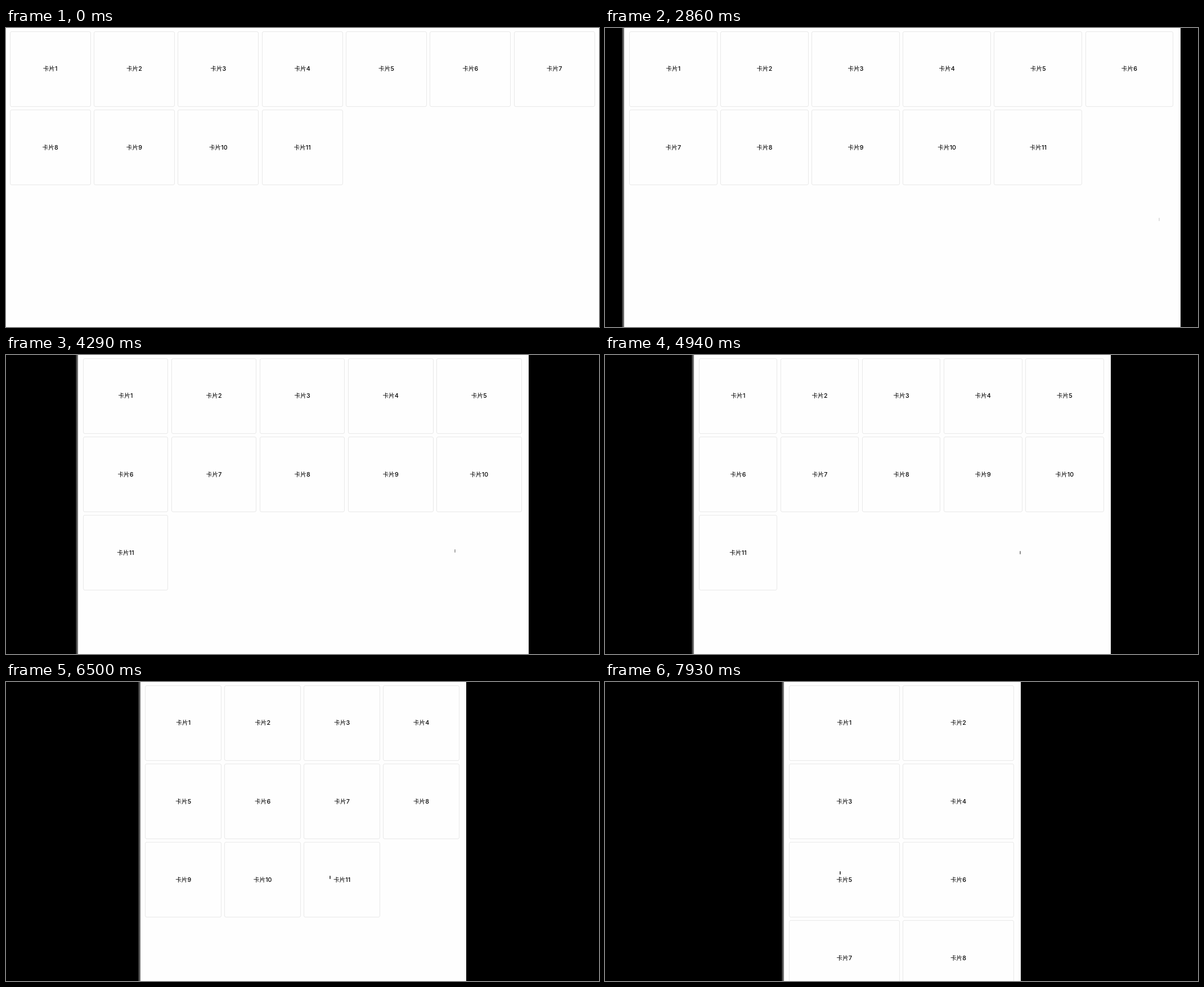
Recreate the animation shown at these times as an HTML page. Size 1054 px wide and 531 px high, loop 8000 ms.

```html
<!DOCTYPE html>
<html lang="zh">
<head>
<meta charset="utf-8">
<style>
  html, body { margin: 0; width: 100%; height: 100%; overflow: hidden; background: #000; }
  #panel {
    position: absolute; top: 0; bottom: 0; box-sizing: border-box;
    background: #fefefe; border-left: 1px solid #eee;
  }
  #edge {
    position: absolute; top: 0; bottom: 0; width: 4px;
    background: linear-gradient(90deg, #222, #555 50%, #8a8a8a);
  }
  #grid {
    position: absolute; top: 6px; display: grid; gap: 5.35px;
    grid-template-columns: repeat(auto-fill, minmax(133.8px, 1fr));
    grid-auto-rows: 133.8px;
    font: 500 10.7px Inter, "Noto Sans CJK SC", "Noto Sans CJK", sans-serif;
    color: #000;
  }
  #grid div {
    display: flex; align-items: center; justify-content: center;
    box-sizing: border-box; padding-bottom: 2px;
    border: 1px solid #e8e8e8; border-radius: 3px;
  }
  #pointer {
    position: absolute; width: 2px; height: 6px;
    background: #000; border-radius: 1px;
  }
</style>
</head>
<body>
<div id="panel"></div>
<div id="edge"></div>
<div id="grid"></div>
<div id="pointer"></div>
<script>
const LOOP = 8000, STEP = 130, MIRROR = 1057, DRAG_START = 16;
const [panel, edge, grid, pointer] =
  ['panel', 'edge', 'grid', 'pointer'].map(id => document.getElementById(id));

for (let i = 1; i <= 11; i++) {
  grid.appendChild(document.createElement('div')).textContent = '卡片' + i;
}

// The drag rests for one step at each pause; key points count moving steps only.
const pauses = [17, 30, 37, 42, 49, 56, 60];
const dragPoints = [
  [16, 0], [23, 48], [28, 109], [34, 147], [38, 191], [44, 229], [50, 288], [54, 318]
];

function panelLeft(step) {
  if (step < DRAG_START) return -2;
  const moved = step - pauses.filter(p => p <= step).length;
  const next = Math.max(1, dragPoints.findIndex(([s]) => s >= moved));
  const [s0, x0] = dragPoints[next - 1], [s1, x1] = dragPoints[next];
  return x0 + (x1 - x0) * (moved - s0) / (s1 - s0);
}

function place(el, left, width) {
  el.style.left = left + 'px';
  el.style.width = width + 'px';
}

function draw(now) {
  const step = Math.floor(now % LOOP / STEP);
  const left = panelLeft(step);
  const width = MIRROR - 2 * left;
  place(panel, left, width);
  place(grid, left + 8.6, width - 21);
  edge.style.left = left - 4 + 'px';

  // The pointer tracks the right side at double speed, dipping midway.
  const dragged = step - DRAG_START;
  const dip = Math.sin(Math.PI * dragged / 50) ** 2;
  pointer.style.left = 1053 - 2 * left + 'px';
  pointer.style.top = 335 + 13 * dip + 'px';
  pointer.style.opacity = Math.min(Math.max(dragged / 50, 0), .7);
}

const start = performance.now();
function tick() {
  draw(performance.now() - start);
  requestAnimationFrame(tick);
}
tick();
</script>
</body>
</html>
```
